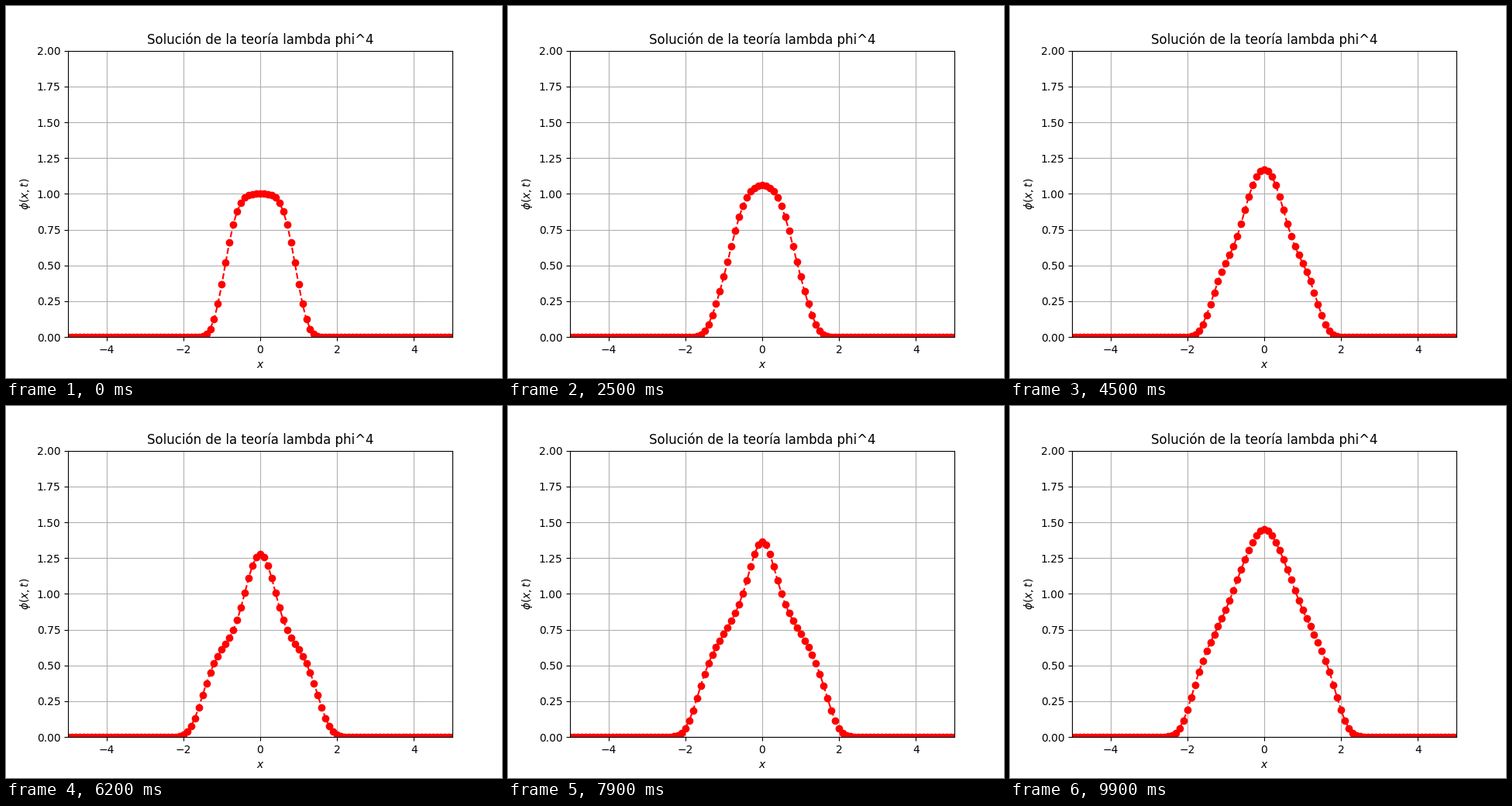
Recreate the animation shown at these times as a matplotlib script. Size 640 by 480 pixels, loop 10 s.

```python
import numpy as np
import matplotlib.pyplot as plt
from matplotlib.animation import FuncAnimation

FRAMES = 100
DX, DT = 0.1, 0.01
MASS2, LAM = 1.0, 1.0

x = np.linspace(-5, 5, 101)


def accel(phi):
    """Right-hand side of phi_tt = phi_xx + m^2 phi + lambda phi^3."""
    a = np.zeros_like(phi)
    mid = phi[1:-1]
    a[1:-1] = (phi[2:] - 2 * mid + phi[:-2]) / DX**2 + MASS2 * mid + LAM * mid**3
    return a


def solve():
    """Leapfrog integration from a field at rest."""
    phi = np.zeros((FRAMES, x.size))
    phi[0] = np.exp(-x**4)
    phi[1] = phi[0] + 0.5 * DT**2 * accel(phi[0])
    for n in range(1, FRAMES - 1):
        phi[n + 1] = 2 * phi[n] - phi[n - 1] + DT**2 * accel(phi[n])
    return phi


phi = solve()

fig, ax = plt.subplots(figsize=(6.4, 4.8), dpi=100)
line, = ax.plot(x, phi[0], "ro--")
ax.set_xlim(-5, 5)
ax.set_ylim(0, 2)
ax.set_xlabel("$x$")
ax.set_ylabel(r"$\phi(x,t)$")
ax.set_title("Solución de la teoría lambda phi^4")
ax.grid(True)


def update(n):
    line.set_ydata(phi[n])
    return line,


anim = FuncAnimation(fig, update, frames=FRAMES, interval=100, repeat=True, repeat_delay=0)
plt.show()
```
